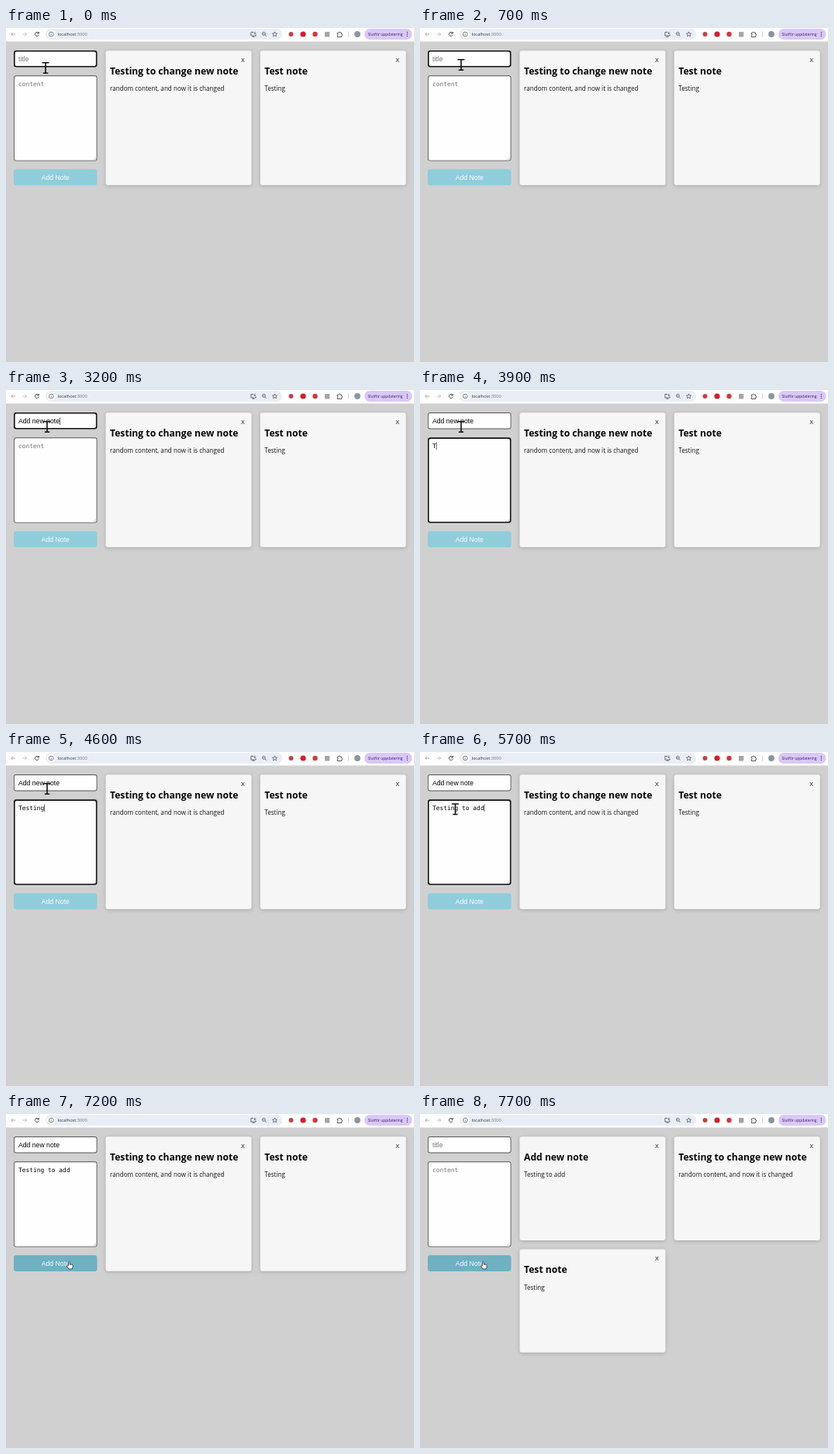
An HTML page with a canvas for the animation above (8 s loop, 526 by 431 pixels).

```html
<!DOCTYPE html>
<html lang="sv">
<head>
<meta charset="utf-8">
<title>Notes</title>
<style>
html, body { margin: 0; width: 526px; height: 431px; overflow: hidden; background: #d0d0d0; }
canvas { display: block; }
</style>
</head>
<body>
<canvas id="stage" width="526" height="431"></canvas>
<script>
const ctx = document.getElementById('stage').getContext('2d');
const LOOP = 8000, STEP = 100, BLINK = 500;
const BLUR_AT = 7100, SAVED_AT = 7600;
const SANS = '"Open Sans", sans-serif';
const ARIAL = '"Liberation Sans", Arial, sans-serif';
const MONO = '"DejaVu Sans Mono", monospace';

// [time, number of typed characters]
const titleField = {
  text: 'Add new note', hint: 'title', font: `8.67px ${ARIAL}`,
  x: 10, y: 29, w: 107.5, h: 21.5, base: 43, from: 0, to: 3500,
  keys: [[200, 0], [1400, 1], [1800, 2], [2100, 3], [2300, 4], [2600, 5], [2700, 6],
    [2800, 7], [2900, 8], [3000, 9], [3100, 11], [3200, 12]]
};
const contentField = {
  text: 'Testing to add', hint: 'content', font: `7.92px ${MONO}`,
  x: 10, y: 61.3, w: 107.5, h: 110.3, base: 75, from: 3500, to: BLUR_AT,
  keys: [[3500, 0], [3800, 1], [4000, 2], [4200, 3], [4300, 4], [4400, 5], [4600, 7],
    [4700, 8], [4800, 9], [5000, 10], [5100, 11], [5200, 12], [5300, 13], [5400, 14]]
};
// [time, x, y]
const mousePath = [[0, 51, 51.5], [500, 53, 47.5], [5600, 53, 47.5], [5800, 38, 100],
  [6000, 28, 155], [6100, 28, 155], [6200, 26, 190], [6400, 26, 197], [6600, 36, 198],
  [7000, 76, 196], [7200, 82, 195]];
const added = ['Add new note', 'Testing to add'];
const changed = ['Testing to change new note', 'random content, and now it is changed'];
const tested = ['Test note', 'Testing'];

function text(str, x, y, font, color, align = 'left') {
  ctx.font = font;
  ctx.fillStyle = color;
  ctx.textAlign = align;
  ctx.fillText(str, x, y);
}

function box(x, y, w, h, r, fill) {
  ctx.beginPath();
  ctx.roundRect(x, y, w, h, r);
  ctx.fillStyle = fill;
  ctx.fill();
}

function disc(x, y, r, fill) {
  ctx.beginPath();
  ctx.arc(x, y, r, 0, Math.PI * 2);
  ctx.fillStyle = fill;
  ctx.fill();
}

function path(d, color, width, fill, x = 0, y = 0) {
  const shape = new Path2D(d);
  ctx.save();
  ctx.translate(x, y);
  ctx.lineJoin = 'round';
  if (fill) { ctx.fillStyle = fill; ctx.fill(shape); }
  ctx.strokeStyle = color;
  ctx.lineWidth = width;
  ctx.stroke(shape);
  ctx.restore();
}

function star(x, y, r) {
  ctx.beginPath();
  for (let i = 0; i < 10; i++) {
    const a = -Math.PI / 2 + i * Math.PI / 5, d = i % 2 ? r * 0.45 : r;
    ctx.lineTo(x + d * Math.cos(a), y + d * Math.sin(a));
  }
  ctx.closePath();
  ctx.strokeStyle = '#444';
  ctx.lineWidth = 0.7;
  ctx.stroke();
}

function toolbar() {
  const ink = '#474747';
  box(0, 0, 526, 17.5, 0, '#fdfdfe');
  path('M12 8H6.8M9.2 5.6L6.8 8l2.4 2.4', '#9a9a9a', 0.8);
  path('M21.5 8h5.2M24.3 5.6L26.7 8l-2.4 2.4', '#b5b5b5', 0.8);
  path('M42 6.6A2.5 2.5 0 1 0 42.3 8.7M42.3 5v2H40.3', '#333', 0.9);

  box(51, 1, 305, 14, 7, '#e9eef6');
  disc(58.3, 8, 5.2, '#fff');
  path('M55.4 8a2.9 2.9 0 1 0 5.8 0a2.9 2.9 0 1 0 -5.8 0M58.3 7.6v2M58.3 6.2v.7', ink, 0.7);
  text('localhost', 66.5, 10.1, `5.7px ${SANS}`, '#333');
  const hostWidth = ctx.measureText('localhost').width;
  text(':3000', 66.5 + hostWidth, 10.1, `5.7px ${SANS}`, '#777');

  path('M319 5.4H315.9v4.6h6.2V8.4M317.4 11.2h3.2M320.8 4.8v2.8M319.5 6.5l1.3 1.3l1.3-1.3', ink, 0.8);
  path('M330.4 7.4a2 2 0 1 0 4 0a2 2 0 1 0 -4 0M333.9 9l1.8 1.8M331.5 7.4h1.8', ink, 0.7);
  star(346.5, 8.2, 3.3);

  disc(367.5, 8, 3, '#b9474c');
  disc(383, 8, 3.6, '#d21f2c');
  disc(398.5, 8, 3.2, '#cf3a40');
  box(411, 5, 6.2, 6.4, 0.6, '#a5a5a5');
  path('M427.2 6.2h1.7a1 1 0 0 1 2 0h1.7v1.7a1 1 0 0 1 0 2v1.6h-5.4V9.9a1 1 0 0 0 0-2z', '#444', 0.9);
  path('M441.5 4.5v7', '#cfc4e8', 0.8);
  disc(453, 8, 3.9, '#89979b');

  box(462, 1, 61.5, 14, 7, '#d9c8f7');
  text('Slutför uppdatering', 466.5, 9.8, `4.95px ${SANS}`, '#32215a');
  for (const y of [5.7, 8, 10.3]) disc(517.3, y, 0.65, '#32215a');
}

function field(f, t) {
  const focused = t >= f.from && t < f.to;
  const last = f.keys.filter(k => k[0] <= t).pop();
  const typed = last && t < SAVED_AT ? f.text.slice(0, last[1]) : '';
  const line = focused ? 1.6 : 0.9;

  box(f.x, f.y, f.w, f.h, 3, focused ? '#111' : '#555');
  box(f.x + line, f.y + line, f.w - 2 * line, f.h - 2 * line, 2, '#fefefe');
  text(typed || f.hint, 16, f.base, f.font, typed ? '#050505' : '#757575');

  if (focused && last && Math.floor((t - last[0]) / BLINK) % 2 === 0) {
    const x = 16 + ctx.measureText(typed).width;
    ctx.fillStyle = '#222';
    ctx.fillRect(x, f.base - 7.5, 0.7, 9.5);
  }
}

function card([title, body], x, y, h) {
  ctx.save();
  ctx.shadowColor = 'rgba(0,0,0,0.2)';
  ctx.shadowBlur = 5;
  ctx.shadowOffsetY = 1;
  box(x, y, 188, h, 3, '#f6f6f6');
  ctx.restore();
  text('X', x + 177, y + 14.8, `7.2px ${ARIAL}`, '#111', 'center');
  text(title, x + 5.5, y + 30.7, `bold 12.15px ${SANS}`, '#050505');
  text(body, x + 5.5, y + 52, `8.13px ${SANS}`, '#151515');
}

function mouseAt(t) {
  const next = mousePath.findIndex(k => k[0] > t);
  if (next < 0) return mousePath.at(-1).slice(1);
  const [a, b] = [mousePath[next - 1], mousePath[next]];
  const p = (t - a[0]) / (b[0] - a[0]);
  return [a[1] + (b[1] - a[1]) * p, a[2] + (b[2] - a[2]) * p];
}

function pointer(x, y, hand) {
  if (hand) {
    path('M-1.6 .8V-3.6q.9-1.3 1.8 0V-.8q1-.6 1.4.2q1-.5 1.4.3q1-.3 1.2.7V2.2L3.2 5H-.9L-3.4 1.4q.3-1.3 1.8-.6z',
      '#222', 0.8, '#fff', x, y);
  } else {
    path('M-4 -6.3V-6.7H4V-6.3M0 -6.5V6.8M-3.2 6.8H3.2', '#111', 1.6, null, x, y);
  }
}

function draw(t) {
  box(0, 0, 526, 431, 0, '#d0d0d0');
  toolbar();
  field(titleField, t);
  field(contentField, t);
  path('M112.5 170L116 166.5M114.7 170L116 168.7', '#888', 0.5);

  const [mx, my] = mouseAt(t);
  const hover = my > 182;
  box(10, 182.3, 107.5, 20.7, 3, hover ? '#6eb1c2' : '#90cddb');
  text('Add Note', 63.8, 195.8, `8.67px ${ARIAL}`, '#fafdfe', 'center');

  if (t < SAVED_AT) {
    card(changed, 128.5, 29.3, 173.5);
    card(tested, 327.7, 29.3, 173.5);
  } else {
    card(added, 128.5, 29.3, 133.7);
    card(changed, 327.7, 29.3, 133.7);
    card(tested, 128.5, 174.5, 133.3);
  }
  pointer(mx, my, hover);
}

const start = performance.now();
function tick() {
  const t = (performance.now() - start) % LOOP;
  draw(Math.floor(t / STEP) * STEP);
  requestAnimationFrame(tick);
}
tick();
</script>
</body>
</html>
```
